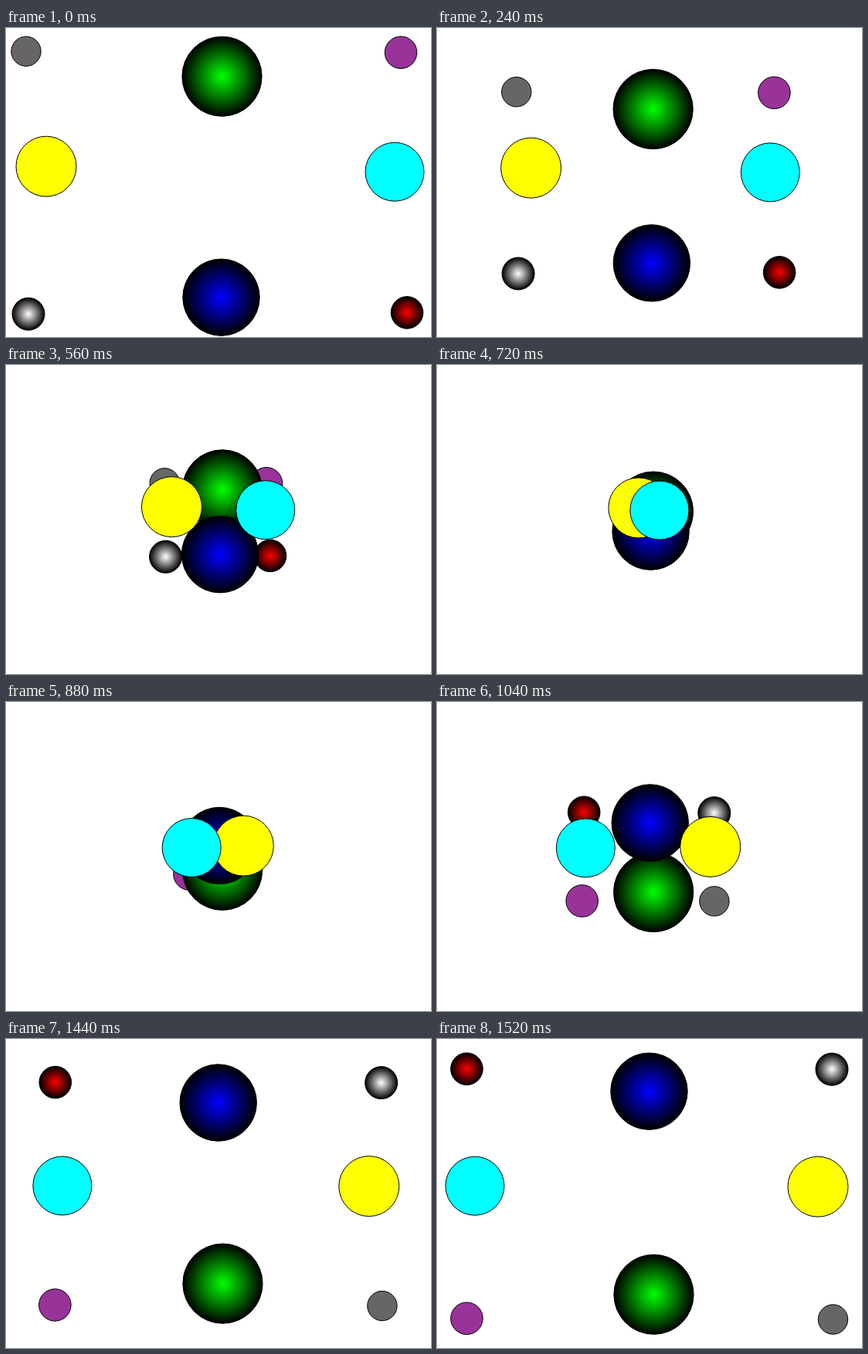
An HTML page with a canvas for the animation above (1600 ms loop, 550 px wide and 400 px high).

```html
<!DOCTYPE html>
<html lang="en">
<head>
<meta charset="utf-8">
<title>Crossing balls</title>
<style>
  html, body { margin: 0; width: 100%; height: 100%; overflow: hidden; background: #fff; }
  canvas { display: block; }
</style>
</head>
<body>
<canvas id="stage" width="550" height="400"></canvas>
<script>
const ctx = document.getElementById('stage').getContext('2d');
const STEP_MS = 80, STEPS = 20;

// Back to front; each ball travels in a straight line.
const balls = [
  { r: 19.2, color: '#666666', from: [26, 30.2], to: [512.5, 363] },
  { r: 20.8, color: '#993399', from: [511, 31.7], to: [38.5, 361.7] },
  { r: 51.6, color: '#00ff00', from: [279.5, 62.7], to: [280.5, 330.7], shaded: true },
  { r: 20.8, color: '#ff0000', from: [519, 368.4], to: [38.5, 38.7], shaded: true },
  { r: 21, color: '#ffffff', from: [29, 370.2], to: [511, 39.2], shaded: true },
  { r: 49.7, color: '#0000ff', from: [278.5, 348.7], to: [274.5, 67.7], shaded: true },
  { r: 39, color: '#ffff00', from: [52, 179.2], to: [493, 191.2] },
  { r: 38, color: '#00ffff', from: [503, 186.2], to: [49, 190.2] }
];

function drawBall({ r, color, from, to, shaded }, progress) {
  const [x, y] = from.map((start, i) => start + (to[i] - start) * progress);
  let fill = color;
  if (shaded) {
    fill = ctx.createRadialGradient(x, y, 0, x, y, r);
    fill.addColorStop(0, color);
    fill.addColorStop(1, '#000');
  }
  ctx.beginPath();
  ctx.arc(x, y, r, 0, Math.PI * 2);
  ctx.fillStyle = fill;
  ctx.fill();
  ctx.stroke();
}

function render() {
  const step = Math.floor(performance.now() / STEP_MS) % STEPS;
  ctx.clearRect(0, 0, 550, 400);
  balls.forEach(ball => drawBall(ball, step / (STEPS - 1)));
  requestAnimationFrame(render);
}

render();
</script>
</body>
</html>
```
